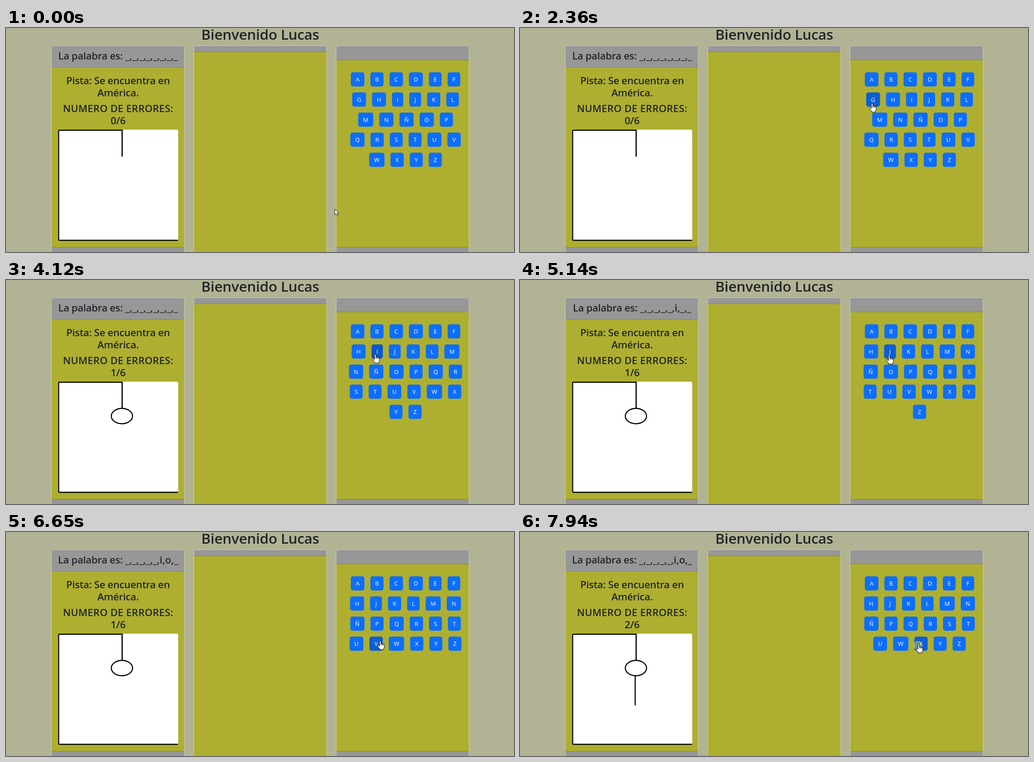
Recreate the animation shown at these times as an HTML page. Size 1124 by 498 pixels, loop 8 s.

```html
<!DOCTYPE html>
<html lang="es">
<head>
<meta charset="utf-8">
<title>Ahorcado</title>
<style>
  html, body { margin: 0; width: 100%; height: 100%; overflow: hidden; background: #b2b394; }
  svg { display: block; }
  text { font-family: "Open Sans", "Noto Sans", sans-serif; text-anchor: middle; fill: #212529; }
  .title { font-size: 31.5px; font-weight: 600; letter-spacing: -.25px; }
  .info { font-size: 22px; font-weight: 600; letter-spacing: -.25px; }
  .caps { letter-spacing: .25px; }
  .blanks { letter-spacing: 0; }
  #keys text { font-size: 13px; fill: #fff; }
  .ink { fill: none; stroke: #000; stroke-width: 2.4; }
</style>
</head>
<body>
<svg width="1124" height="498" viewBox="0 0 1124 498">
  <text class="title" x="562.5" y="26">Bienvenido Lucas</text>
  <g id="cards"></g>
  <text class="info" x="248" y="70">La palabra es: <tspan id="word" class="blanks"></tspan></text>
  <text class="info" x="248" y="125">Pista: Se encuentra en</text>
  <text class="info" x="248" y="152.3">América.</text>
  <text class="info caps" x="248" y="187">NUMERO DE ERRORES:</text>
  <text class="info" id="count" x="248" y="214.3"></text>
  <rect x="115.5" y="226" width="265.5" height="247" rx="4" fill="#fff"/>
  <path class="ink" d="M257 286V227.2H118.5Q116.5 227.2 116.5 229V470Q116.5 472 118.5 472H380.5"/>
  <path class="ink" d="M257 226V286"/>
  <ellipse class="ink" id="head" cx="256.5" cy="302.5" rx="23.5" ry="17"/>
  <path class="ink" id="body" d="M254.8 320V385.5" stroke-width="2.7"/>
  <g id="keys"></g>
  <circle id="ring" r="10" fill="rgb(240,230,60)" fill-opacity=".42"/>
  <g id="pointer" stroke="#000" fill="#fff" stroke-linejoin="round">
    <path id="arrow" d="M.5.5V13.3L3.5 10.5 5.6 15.3 7.7 14.4 5.6 9.7H9.6Z" stroke-width=".9"/>
    <path id="hand" d="M-1.6 12.2V1.6Q-1.6.4 0 .4T1.6 1.6V6.4Q3.9 5.3 4.4 7 6.4 6 7 7.8 9.2 7 9.2 9.2V13.5Q9.2 15.6 7.4 17.4V19.8H-1.2V17.8Q-3.8 15.4-5.6 11.8-6.6 9.9-5.3 9.4-4.2 9-2.9 10.6Z M1.6 6.4V10M4.4 7V10.2M7 7.8V10.4" stroke-width="1"/>
  </g>
</svg>
<script>
const LOOP = 8000;
const $ = id => document.getElementById(id);

// Letters with their advance in thousandths of an em
const ADVANCE = {
  A: 645, B: 573, C: 619, D: 701, E: 506, F: 488, G: 687, H: 710, I: 266,
  J: 357, K: 580, L: 471, M: 898, N: 748, Ñ: 748, O: 754, P: 560, Q: 754,
  R: 598, S: 531, T: 524, U: 687, V: 621, W: 934, X: 590, Y: 553, Z: 570
};
const EM = 13.25, PAD = 21.5, GAP = 13.25, KEY_H = 31.5, PITCH = 44.7;
const ROW_LIMIT = 252, KEYS_X = 884, KEYS_Y = 98.5;

const GUESSES = [
  { letter: 'G', press: 2510, done: 2575 },
  { letter: 'I', press: 4060, done: 4195 },
  { letter: 'O', press: 5700, done: 5830 },
  { letter: 'V', press: 6850, done: 6920 },
  { letter: 'X', press: 7940, done: LOOP }
];

// Pointer path: time, x, y
const PATH = [
  [0, 727, 402], [60, 727, 402], [160, 584, 332], [420, 584, 332], [490, 583, 331],
  [1080, 583, 331], [1350, 648, 302], [1550, 722, 245], [1680, 743, 209], [1880, 755, 175],
  [1950, 755, 175], [2200, 775, 170], [2360, 779, 167], [2900, 779, 167], [2970, 780, 168],
  [3260, 780, 168], [3730, 817, 165], [5080, 817, 165], [5140, 817, 167], [5560, 820, 198],
  [6300, 820, 198], [6500, 828, 242], [7460, 828, 242], [7780, 882, 249], [LOOP, 882, 249]
];

function pointerAt(t) {
  const i = Math.max(1, PATH.findIndex(p => p[0] >= t));
  const [t0, x0, y0] = PATH[i - 1], [t1, x1, y1] = PATH[i];
  const k = Math.max(0, (t - t0) / (t1 - t0));
  return [x0 + (x1 - x0) * k, y0 + (y1 - y0) * k];
}

function layout(t) {
  const gone = GUESSES.filter(g => t >= g.done).map(g => g.letter);
  const rows = [];
  let row;
  for (const letter in ADVANCE) {
    if (gone.includes(letter)) continue;
    const w = ADVANCE[letter] / 1000 * EM + PAD;
    if (!row || row.span + GAP + w > ROW_LIMIT) rows.push(row = { span: -GAP, keys: [] });
    row.keys.push({ letter, w, x: row.span + GAP });
    row.span += GAP + w;
  }
  return rows.flatMap((r, i) => r.keys.map(k =>
    ({ ...k, x: k.x + KEYS_X - r.span / 2, y: KEYS_Y + i * PITCH })));
}

function letterUnder(t) {
  const [px, py] = pointerAt(t);
  return layout(t).find(k => px >= k.x && px <= k.x + k.w && py >= k.y && py <= k.y + KEY_H)?.letter;
}

function keySvg(k, shade) {
  const fill = `rgb(${13 - 2 * shade},${110 - 16 * shade},${253 - 38 * shade})`;
  return `<rect x="${k.x}" y="${k.y}" width="${k.w}" height="${KEY_H}" rx="4.8" fill="${fill}"/>` +
    `<text x="${k.x + k.w / 2}" y="${k.y + 20.7}">${k.letter}</text>`;
}

function card(x, headEnd, footStart) {
  const foot = footStart ? `<path d="M${x} ${footStart}h294v20h-294z" fill="#979797"/>
    <path d="M${x} ${footStart}h294" stroke="#85854f"/>` : '';
  return `<rect x="${x}" y="39.5" width="294" height="480" rx="5" fill="#979797"/>
    <path d="M${x} ${headEnd}h294V510h-294z" fill="#aeaf30"/>
    <path d="M${x} ${headEnd - .5}h294" stroke="#85854f"/>${foot}
    <rect x="${x}" y="39.5" width="294" height="480" rx="5" fill="none" stroke="#cbccba"/>`;
}

function show(id, on) { $(id).style.display = on ? '' : 'none'; }

function draw(t) {
  const done = letter => t >= GUESSES.find(g => g.letter === letter).done;
  $('word').textContent = ['_', '_', '_', '_', '_', done('I') ? 'i' : '_', done('O') ? 'o' : '_', '_'].join(',');
  $('count').textContent = `${done('G') + done('V')}/6`;
  show('head', t >= 3260);
  show('body', t >= 7460);

  // Hover fades over 150 ms, as the share of that time spent on each key
  const recent = [0, 30, 60, 90, 120].map(d => letterUnder(Math.max(0, t - d)));
  const click = GUESSES.find(g => t >= g.press && t < g.done);
  const pressed = click && t >= click.press + 60 ? click.letter : '';
  $('keys').innerHTML = layout(t).map(k =>
    keySvg(k, k.letter === pressed ? 1.35 : recent.filter(l => l === k.letter).length / 5)).join('');

  const [x, y] = pointerAt(t);
  $('pointer').setAttribute('transform', `translate(${x} ${y})`);
  show('hand', recent[0]);
  show('arrow', !recent[0]);
  show('ring', click && !pressed);
  $('ring').setAttribute('cx', x - 2);
  $('ring').setAttribute('cy', y + 3);
}

$('cards').innerHTML = card(100.5, 88, 487.5) + card(415.5, 53.5) + card(730.5, 71.5, 487.5);

const start = performance.now();
function tick() {
  draw((performance.now() - start) % LOOP);
  requestAnimationFrame(tick);
}
tick();
</script>
</body>
</html>
```
